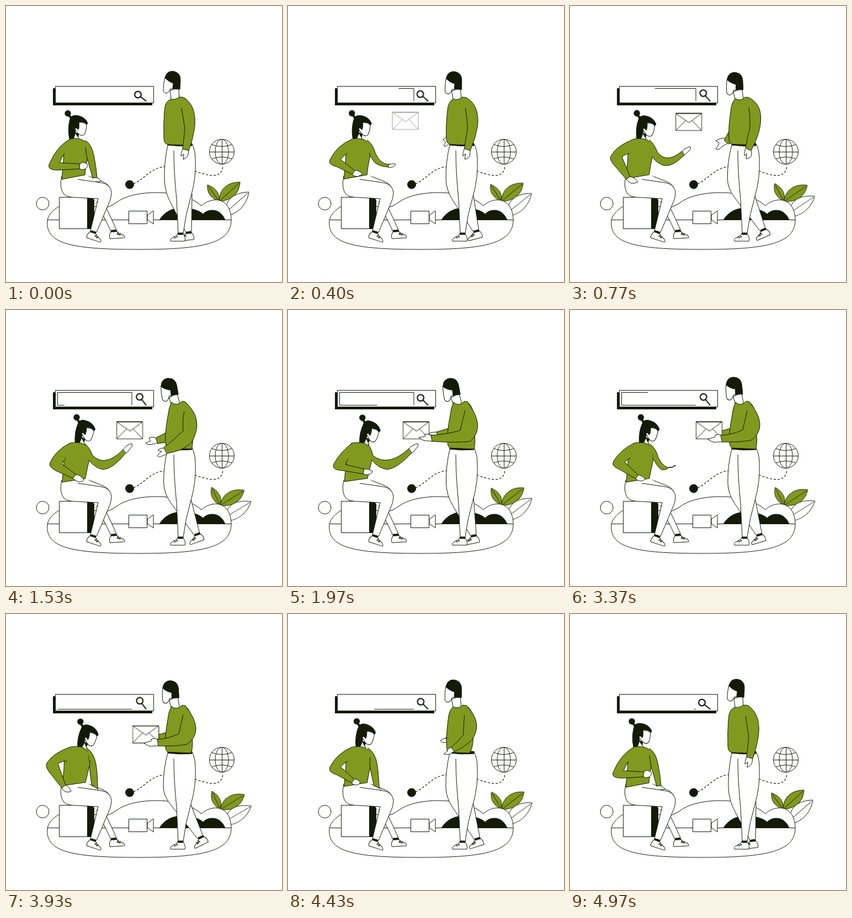
An HTML page for the animation above (5 s loop, 500 px wide and 500 px high).

```html
<!DOCTYPE html>
<html lang="en">
<head>
<meta charset="utf-8">
<title>Sharing messages</title>
<style>
  html, body { margin: 0; width: 100%; height: 100%; overflow: hidden; background: #fff; }
  svg { display: block; width: 100%; height: 100%; stroke: #141a06; stroke-width: 1; stroke-linejoin: round; fill: #fff; }
  .dark { fill: #141a06; }
  .green { fill: #81991f; }
  .line { fill: none; }

  #plant { transform-origin: 385px 365px; animation: sway 1.25s cubic-bezier(.37, 0, .63, 1) infinite alternate; }
  @keyframes sway { to { transform: rotate(11.5deg); } }

  #lens { transform-origin: 254px 172px; animation: tilt 1.25s ease-in-out infinite alternate; }
  @keyframes tilt { to { transform: rotate(15deg); } }

  #trace { stroke-dasharray: 100 300; animation: trace 5s linear infinite; }
  @keyframes trace { from { stroke-dashoffset: 100; } to { stroke-dashoffset: -100; } }

  #letter { animation: carry 5s linear infinite, fade 5s linear infinite; }
  @keyframes carry {
    0% { transform: translate(186.5px, 190.5px); }
    15.4% { transform: translate(191.5px, 194.5px); }
    30.6% { transform: translate(200.5px, 202.5px); }
    39.4% { transform: translate(208.5px, 202.5px); }
    56.6% { transform: translate(227.5px, 202.5px); }
    78.6%, 100% { transform: translate(229.5px, 202.5px); }
  }
  @keyframes fade {
    0%, 5% { opacity: 0; }
    12%, 82% { opacity: 1; }
    88%, 100% { opacity: 0; }
  }
</style>
</head>
<body>
<svg viewBox="0 0 500 500">
  <defs>
    <g id="shoe">
      <path d="M-5 1Q-8 6 -15 8Q-20 11 -18 14L8 14Q10 8 5 1Z"/>
      <path class="line" d="M-12 5L-8 9M-8 3L-5 8M-12 9L-5 5"/>
      <path class="dark" d="M-4.5 -1L4.5 -1L5 2L-5 2Z"/>
    </g>
  </defs>

  <!-- scenery -->
  <circle cx="66.5" cy="358" r="11.5"/>
  <g id="plant">
    <path class="green" d="M386 354C372 348 364 340 365 324C380 330 387 338 386 354Z"/>
    <path class="line" d="M386 354L367 327"/>
    <path class="green" d="M386 354C386 335 398 319 424 319C422 343 406 352 386 354Z"/>
    <path class="line" d="M386 354L422 321"/>
    <path d="M398 372C398 351 412 338 440 337C436 362 418 378 398 380Z"/>
    <path class="line" d="M398 374L438 339"/>
  </g>
  <path d="M75 388C78 374 92 364 110 356L180 366Q192 362 200 356C230 332 320 330 354 362C372 345 406 345 408 386C409 430 358 441 240 441C115 441 71 430 75 388Z"/>
  <path class="line" d="M75 387.5H408"/>
  <path class="dark" d="M278 387.5C288 372 302 366 318 366C335 366 350 370 357 377C365 368 380 368 388 375Q394 380 397 387.5Z"/>
  <rect x="222.500" y="371.500" width="33" height="23"/>
  <path d="M256 379L267 371V395L256 387Z"/>
  <path class="line" stroke-width="1.2" stroke-dasharray="4 3" d="M231 322C248 316 262 293 288 291M342 299C365 307 392 316 393 288"/>
  <circle class="dark" cx="224" cy="323.500" r="7.500"/>
  <g class="line">
    <circle cx="391" cy="264" r="22.500"/>
    <ellipse cx="391" cy="264" rx="12" ry="22.500"/>
    <path d="M391.500 241.500V286.500M368.500 264.500H413.500M373 251Q391 258 409 251M373 277Q391 270 409 277"/>
  </g>

  <!-- search bar -->
  <path class="dark" stroke="none" d="M85 149H265V180H85Z"/>
  <rect x="89.500" y="145.500" width="178" height="30"/>
  <path id="trace" class="line" pathLength="100" d="M228 172.500V149.500H93.500V172.500H228"/>
  <g id="lens" class="line" stroke-width="2.200" stroke-linecap="round">
    <circle cx="239" cy="160.500" r="5.800"/>
    <path d="M244 164.500L253.500 172"/>
  </g>

  <!-- seated woman -->
  <rect x="96.500" y="346.500" width="51" height="57"/>
  <rect class="dark" x="147.500" y="346.500" width="12" height="57"/>
  <path d="M120 320L144 306L170 316Q186 322 188 330L180 362L200 405L190 408L164 354"/>
  <use href="#shoe" transform="translate(195.500 407) scale(-1 1) rotate(3)"/>
  <path id="wFarHand"/>
  <path stroke="none" d="M101 304H144L164 318L104 330Z"/>
  <path d="M101 308Q96 330 105 341Q111 347 130 347L167 349L153 407L164 410L186 358Q193 343 190 333Q186 322 172 320L130 314"/>
  <use href="#shoe" transform="translate(158 409) scale(-1 1) rotate(-18)"/>
  <g id="wHead">
    <path d="M119 248L126 220L133 228L131 233Q130 238 135 248Z"/>
    <path class="dark" d="M125 229L132 232L130 237Z"/>
    <path d="M128 210L146 212Q146 225 142 233Q136 237 131 231L124 222Z"/>
    <path class="dark" d="M115 241Q111 222 116 205Q118 198 126 198Q142 199 148 212L146 215Q138 207 132 211Q133 220 131 224Q127 219 125 222Q127 231 122 240Z"/>
    <path class="line" stroke-width="4" d="M113 197L119 204"/>
    <circle class="dark" cx="112" cy="194.500" r="5.200"/>
  </g>
  <path id="wTorso" class="green"/>
  <path id="wFarArm" class="green"/>
  <path id="wHand"/>
  <path id="wArm" class="green"/>

  <!-- standing man -->
  <path id="mFarHand"/>
  <path id="mFarArm" class="green"/>
  <path id="mBackLeg"/>
  <g id="mBackShoe"><use href="#shoe"/></g>
  <path d="M304 262Q304 300 309 350L312 412L321 412Q325 378 335 345Q345 310 343 275Q342 258 337 250"/>
  <use href="#shoe" transform="translate(316 412)"/>
  <path class="dark" d="M293 247L337 249V253Q315 255 293 252Z"/>
  <g id="mHead">
    <path d="M297 153L300 176L314 176L313 148Z"/>
    <path d="M288 129Q285 140 285 153Q286 158 291 158Q296 156 298 150L302 150L304 139Z"/>
    <path class="dark" d="M288 130Q291 118 302 118Q316 120 316 134L315 151L302 150L303 140Q294 137 288 130Z"/>
  </g>
  <path id="mTorso" class="green"/>
  <g id="letter">
    <rect width="47" height="31"/>
    <path class="line" d="M0 0L24 17L47 0M0 31L18 13M47 31L30 13"/>
    <path class="line" stroke-width="1.500" d="M0 0H47"/>
  </g>
  <path id="mHand"/>
  <path id="mArm" class="green"/>
</svg>

<script>
const LOOP = 5000;
const TIMES = [0, 770, 1530, 1970, 2830, 3930];
const NUMBER = /-?\d+(\.\d+)?/g;
const COUNT = TIMES.length;

const numbers = text => text.match(NUMBER).map(Number);
const span = i => (i + 1 < COUNT ? TIMES[i + 1] : LOOP) - TIMES[i];
const tracks = [];

// A track interpolates every number of a path or a transform.
function track(id, poses) {
  const el = document.getElementById(id);
  const attr = el.tagName === 'path' ? 'd' : 'transform';
  const keys = poses.map(numbers);
  const channels = keys[0].map((_, c) => channel(keys.map(k => k[c])));
  tracks.push({ el, attr, template: poses[0], channels });
}

// Values with slopes that stay level at the extremes.
function channel(values) {
  const rise = values.map((v, i) => (values[(i + 1) % COUNT] - v) / span(i));
  const slopes = rise.map((after, i) => {
    const before = rise[(i + COUNT - 1) % COUNT];
    return before * after <= 0 ? 0 : 2 * before * after / (before + after);
  });
  return { values, slopes };
}

function sample({ values, slopes }, i, u) {
  const j = (i + 1) % COUNT, h = span(i), w = 1 - u;
  return values[i] * (1 + 2 * u) * w * w + slopes[i] * h * u * w * w
       + values[j] * u * u * (3 - 2 * u) - slopes[j] * h * u * u * w;
}

// Poses blended between two extremes.
function blend(from, to, weights) {
  const target = numbers(to);
  return weights.map(w => {
    let n = 0;
    return from.replace(NUMBER, v => (+v + (target[n++] - v) * w).toFixed(2));
  });
}

const step = [0, .86, .7, .24, .13, 1];
const lean = [0, .4, .7, 1, .45, 1];
const nod = [0, .42, .97, 1, .8, .5];
const reach = [0, .6, .95, 1, 1, .9];

track('wHead', blend('rotate(0 120 325)', 'rotate(10 120 325)', lean));
track('wTorso', blend(
  'M114 242Q104 260 104 280L101 314L143 306Q144 290 148 272L147 250Q140 239 122 240Q117 240 114 242Z',
  'M114 242Q104 262 105 280L102 311L144 305Q147 292 152 272L149 252Q144 239 126 240Q118 240 114 242Z', lean));
track('wArm', [
  'M116 241Q92 254 79 285Q72 299 100 297L133 295L134 286L97 284Q100 276 106 267',
  'M116 241Q84 253 74 272Q71 277 78 286L102 314L109 309L94 273Q101 268 108 267',
  'M116 241Q90 254 80 276Q76 284 90 291L121 305L127 298L101 279Q104 273 109 268',
  'M117 241Q95 256 83 279Q78 290 100 291L136 297L138 288L104 280Q106 274 109 270',
  'M117 241Q95 256 83 279Q78 290 100 291L136 297L138 288L104 280Q106 274 109 270',
  'M116 241Q85 252 74 270Q71 276 78 286L101 315L108 310L94 271Q101 267 110 266'
]);
track('wHand', [
  'M134 286Q139 281 147 286Q149 291 144 295Q138 298 133 295',
  'M109 309Q118 311 123 319Q117 322 111 321Q105 319 102 314',
  'M127 298Q135 299 141 307Q139 312 131 311Q126 310 121 305',
  'M138 288Q146 287 153 292Q152 297 146 298Q140 299 136 297',
  'M138 288Q146 287 153 292Q152 297 146 298Q140 299 136 297',
  'M108 310Q115 313 118 321Q113 324 108 322Q103 320 101 315'
]);
track('wFarArm', [
  'M143 243Q155 250 159 270Q163 288 165 311L157 311Q151 290 148 280Q145 270 144 256',
  'M143 242Q153 250 158 264Q174 287 203 263L207 270Q186 292 170 289Q158 285 150 275',
  'M143 242Q152 250 156 262Q178 287 212 253L217 259Q194 288 176 289Q162 287 150 272',
  'M144 242Q151 250 154 264Q182 285 219 251L224 259Q198 287 180 289Q164 287 152 272',
  'M143 242Q152 250 156 263Q176 286 206 254L211 261Q190 290 175 289Q162 287 151 273',
  'M145 242Q159 250 163 272Q166 290 166 317L155 309Q153 295 152 285Q151 275 152 265'
]);
track('wFarHand', [
  'M165 311Q170 313 172 317Q170 319 164 318Q159 317 156 312',
  'M203 263Q208 257 218 255Q220 258 214 264Q210 268 207 270',
  'M212 253Q218 244 228 242Q231 245 224 252Q221 258 217 259',
  'M219 251Q225 244 235 242Q238 246 231 252Q228 258 224 259',
  'M206 254Q211 245 221 243Q224 246 217 253Q214 259 211 261',
  'M166 317Q168 319 168 321Q164 321 161 318Q158 314 156 309'
]);

track('mHead', blend('rotate(0 309 165) translate(0 0)', 'rotate(-14 309 165) translate(0 3)', nod));
track('mTorso', blend(
  'M299 169Q288 172 287 190Q285 215 286 240Q286 250 294 251L321 252Q330 248 333 230L334 180Q326 163 314 165Q308 170 299 169Z',
  'M300 167Q295 178 294 190Q288 220 289 238Q289 248 294 250L337 252Q340 240 338 225L336 185Q330 166 320 165Q309 176 300 167Z', reach));
track('mArm', [
  'M318 185Q321 203 324 222Q322 242 320 259L331 262Q339 241 342 217Q345 178 320 165',
  'M324 184Q327 203 326 220Q321 240 318 257L328 262Q340 240 344 220Q352 178 322 165',
  'M323 184Q319 200 321 219Q303 236 286 249L291 260Q322 255 336 240Q361 198 323 165',
  'M321 182Q316 200 312 218Q290 225 259 227L261 238Q305 241 330 238Q360 212 324 165',
  'M321 182Q317 200 313 217Q295 226 272 227L275 239Q305 240 328 236Q362 212 324 165',
  'M321 182Q317 200 313 217Q295 226 274 227L276 239Q306 240 328 236Q362 212 324 165'
]);
track('mHand', [
  'M320 259Q317 266 317 272Q321 270 322 268L321 278Q330 274 330 268L331 262',
  'M318 258Q315 266 316 271Q318 270 320 267L319 277Q329 276 329 268L328 262',
  'M287 250Q278 250 275 254Q279 256 282 256L274 264Q276 268 284 264L291 261',
  'M260 227Q252 224 248 225Q250 229 248 229L237 231Q245 238 253 237L261 238',
  'M273 227Q265 224 262 227Q264 230 262 230L249 234Q260 242 266 239L275 239',
  'M275 227Q267 224 263 227Q265 230 263 230L250 234Q261 242 267 239L276 239'
]);
track('mFarArm', [
  'M300 210L298 235L305 240L310 215',
  'M291 222L279 243L287 250L300 245',
  'M292 221L271 232L275 242L295 239',
  'M292 214L269 221L271 227L295 224',
  'M292 214L274 219L274 228L295 226',
  'M292 214L275 219L275 228L295 226'
]);
track('mFarHand', [
  'M300 230Q298 235 297 238Q298 240 299 241L298 243Q300 245 304 242L306 240',
  'M280 239Q270 240 264 244Q270 246 270 250L264 259Q268 263 276 254L285 249',
  'M271 231Q264 229 259 232Q261 236 262 237L253 241Q255 245 266 243L275 241',
  'M270 221Q262 221 256 223Q254 224 256 225L258 226Q262 227 266 227L272 227',
  'M275 221Q265 221 258 224Q258 226 260 227L262 228Q266 228 270 228L275 228',
  'M276 221Q266 221 259 224Q259 226 261 227L263 228Q267 228 271 228L276 228'
]);
track('mBackLeg', blend(
  'M293 252Q286 285 287 315Q288 338 299 358L326 410L336 408L337 340',
  'M293 252Q285 280 285 312Q285 329 298 345L347 407L357 402L334 343', step));
track('mBackShoe', blend('translate(331 410) rotate(-6)', 'translate(353 404) rotate(-26)', step));

let start;
function draw(now) {
  start ??= now;
  const t = (now - start) % LOOP;
  const i = TIMES.findLastIndex(time => time <= t);
  const u = (t - TIMES[i]) / span(i);
  for (const { el, attr, template, channels } of tracks) {
    let n = 0;
    el.setAttribute(attr, template.replace(NUMBER, () => sample(channels[n++], i, u).toFixed(2)));
  }
  requestAnimationFrame(draw);
}
requestAnimationFrame(draw);
</script>
</body>
</html>
```
